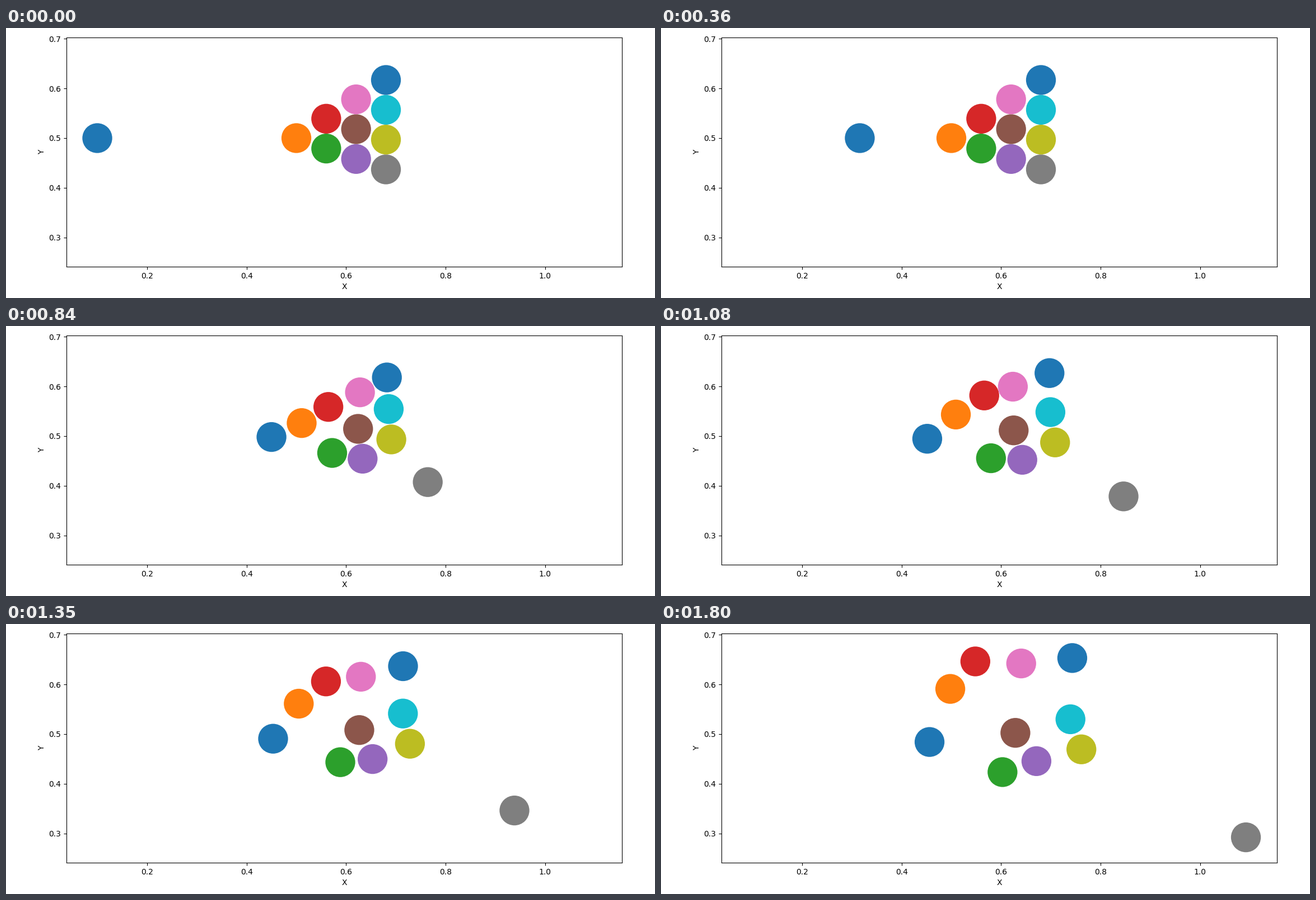
A matplotlib script for the animation above (1.83 s loop, 1159 by 483 pixels).

```python
from itertools import combinations

import numpy as np
import matplotlib.pyplot as plt
from matplotlib.animation import FuncAnimation

W, H, DPI = 1159, 483, 100
FRAMES, INTERVAL = 61, 30
SUBSTEPS = 10

RADIUS = 0.03
CUE_SPEED = 0.018    # data units per frame
RESTITUTION = 0.8
CONTACT_LAG = 0.35   # frames of sliding before the push acts

SCALE = 888.8        # pixels per data unit
LEFT, TOP, WIDTH, HEIGHT = 108, 17, 992, 410
X0, Y0 = 0.0381, 0.2412


def rack():
    """Cue ball, then four slightly skewed rows behind the tip."""
    balls = [(0.1, 0.5)]
    for row in range(4):
        for k in range(row + 1):
            balls.append((0.5 + 2 * RADIUS * row,
                          0.5 - 0.021 * row + 2 * RADIUS * k))
    return np.array(balls)


def collide(pos, vel, i, j):
    gap = pos[j] - pos[i]
    dist = np.hypot(*gap)
    if dist >= 2 * RADIUS:
        return
    rel = vel[j] - vel[i]
    normal = gap / dist
    closing = rel @ normal
    if closing >= 0:
        return
    # The balls slide past each other a little while pressed together.
    normal = gap + CONTACT_LAG * (rel - closing * normal)
    normal /= np.hypot(*normal)
    push = (1 + RESTITUTION) / 2 * (rel @ normal) * normal
    vel[i] += push
    vel[j] -= push


def simulate():
    pos = rack()
    vel = np.zeros_like(pos)
    vel[0] = CUE_SPEED, 0
    pairs = list(combinations(range(len(pos)), 2))
    track = [pos.copy()]
    for _ in range(FRAMES - 1):
        for _ in range(SUBSTEPS):
            pos += vel / SUBSTEPS
            for i, j in pairs:
                collide(pos, vel, i, j)
        track.append(pos.copy())
    return track


track = simulate()

plt.rcParams["font.family"] = "DejaVu Sans"
# The tiny offset keeps the pixel size from rounding down.
fig = plt.figure(figsize=(W / DPI + 1e-9, H / DPI + 1e-9), dpi=DPI,
                 facecolor="white")
ax = fig.add_axes([LEFT / W, 1 - (TOP + HEIGHT) / H, WIDTH / W, HEIGHT / H])
ax.set_xlim(X0, X0 + WIDTH / SCALE)
ax.set_ylim(Y0, Y0 + HEIGHT / SCALE)
ax.set_xticks(np.arange(2, 11, 2) / 10)
ax.set_yticks(np.arange(3, 8) / 10)
ax.set_xlabel("X")
ax.set_ylabel("Y")

balls = [
    ax.add_patch(plt.Circle(center, RADIUS, facecolor=f"C{i % 10}", linewidth=0))
    for i, center in enumerate(track[0])
]


def update(frame):
    for ball, center in zip(balls, track[frame]):
        ball.center = center
    return balls


anim = FuncAnimation(fig, update, frames=FRAMES, interval=INTERVAL,
                     init_func=lambda: update(0), repeat=True, repeat_delay=0)
plt.show()
```
